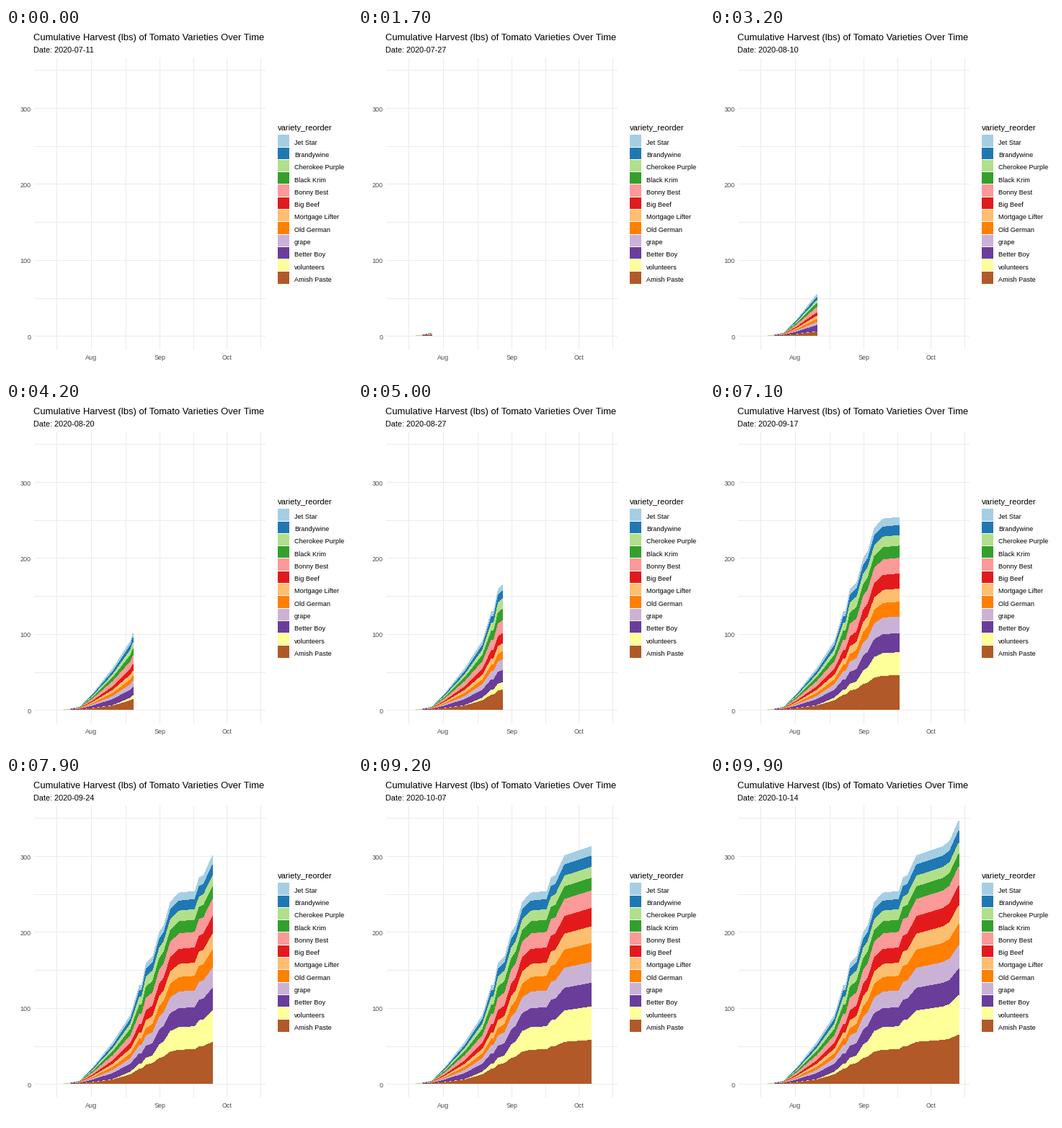
A matplotlib script for the animation above (10000 ms loop, 480 by 480 pixels).

```python
import numpy as np
import matplotlib.pyplot as plt
from matplotlib.animation import FuncAnimation
from matplotlib.patches import Polygon, Rectangle

SIZE, DPI = 480, 100
FRAMES, DAYS = 100, 95
START = np.datetime64("2020-07-11")
X0, PX_DAY = 53.25, 3.0715
BASE, PX_LB = 427, 1.053

plt.rcParams["font.family"] = "Liberation Sans"

# Turning points of the total harvest: day, lbs
TOTAL = [(9, 0), (16, 4), (22, 22), (31, 55), (39, 91), (43, 130), (44, 130),
         (46, 159), (49, 168), (52, 200), (54, 209), (57, 240), (61, 252),
         (68, 254), (70, 272), (72, 275), (76, 301), (88, 313), (91, 320), (95, 347)]

# Lbs of each variety early, midway and at the end, top of the stack first
VARIETIES = [
    ("Jet Star", "#A6CEE3", 4, 8, 13.5),
    ("Brandywine", "#1F78B4", 4, 10.5, 16),
    ("Cherokee Purple", "#B2DF8A", 4, 13.5, 14.5),
    ("Black Krim", "#33A02C", 5, 15, 17),
    ("Bonny Best", "#FB9A99", 7, 17, 24.5),
    ("Big Beef", "#E31A1C", 4.5, 13.5, 26.5),
    ("Mortgage Lifter", "#FDBF6F", 4, 10.5, 24.5),
    ("Old German", "#FF7F00", 4, 10.5, 28.5),
    ("grape", "#CAB2D6", 4, 14, 30.5),
    ("Better Boy", "#6A3D9A", 8, 16, 34.5),
    ("volunteers", "#FFFF99", 0.5, 9.5, 52),
    ("Amish Paste", "#B15928", 5.5, 26.5, 65),
]
amounts = np.array([(0, *v[2:]) for v in VARIETIES])
tops = np.cumsum(amounts[::-1], axis=0)[::-1]

fig = plt.figure(figsize=(SIZE / DPI, SIZE / DPI), dpi=DPI, facecolor="white")
ax = fig.add_axes([0, 0, 1, 1])
ax.set_xlim(0, SIZE)
ax.set_ylim(SIZE, 0)
ax.axis("off")


def label(x, y, s, px, color="black", ha="left"):
    return ax.text(x, y, s, fontsize=px * 72 / DPI, color=color, ha=ha, va="baseline")


def box(x, y, w, h, color):
    ax.add_patch(Rectangle((x, y), w, h, fc=color, lw=0, snap=True, zorder=1))


for x in (70, 118, 166, 213, 260, 306, 353):
    box(x, 41, 1, 405, "#EBEBEB")
for y in (58, 111, 164, 216, 269, 322, 375, 427):
    box(39, y, 321, 1, "#EBEBEB")

for x, month in ((118, "Aug"), (213, "Sep"), (306, "Oct")):
    label(x + .3, 460.5, month, 9, "#4D4D4D", "center")
for lbs in range(0, 301, 100):
    label(34.5, 431.5 - lbs * PX_LB, str(lbs), 9, "#4D4D4D", "right")

label(38.5, 17, "Cumulative Harvest (lbs) of Tomato Varieties Over Time", 13)
subtitle = label(38.5, 34, "", 10.9)
label(377.3, 142, "variety_reorder", 11.1)

areas = []
for i, (name, color, *_) in enumerate(VARIETIES):
    y, below = (int(148.85 + 17.28 * n) for n in (i, i + 1))
    box(377, y, 16, below - y - 1, color)
    label(400, round(161.8 + 17.28 * i), name, 9.2)
    area = Polygon([(0, BASE)] * 3, fc=color, lw=0, antialiased=False, zorder=2)
    areas.append(ax.add_patch(area))


def update(frame):
    now = frame * DAYS / (FRAMES - 1)
    subtitle.set_text(f"Date: {START + int(now)}")
    # The areas grow by whole days
    days = np.arange(round(now) + 1)
    total = np.interp(days, *zip(*TOTAL))
    xs = X0 + PX_DAY * days
    # Half a pixel down, as unsmoothed fills take every pixel they touch
    edges = [np.minimum(BASE, BASE + .5 - PX_LB * np.interp(total, tops[0], top))
             for top in tops]
    edges.append(np.full(len(xs), BASE))
    for area, upper, lower in zip(areas, edges, edges[1:]):
        area.set_xy(np.column_stack([np.append(xs, xs[::-1]),
                                     np.append(upper, lower[::-1])]))
    return [subtitle, *areas]


anim = FuncAnimation(fig, update, frames=FRAMES, interval=100,
                     repeat=True, repeat_delay=0, blit=False)
plt.show()
```
